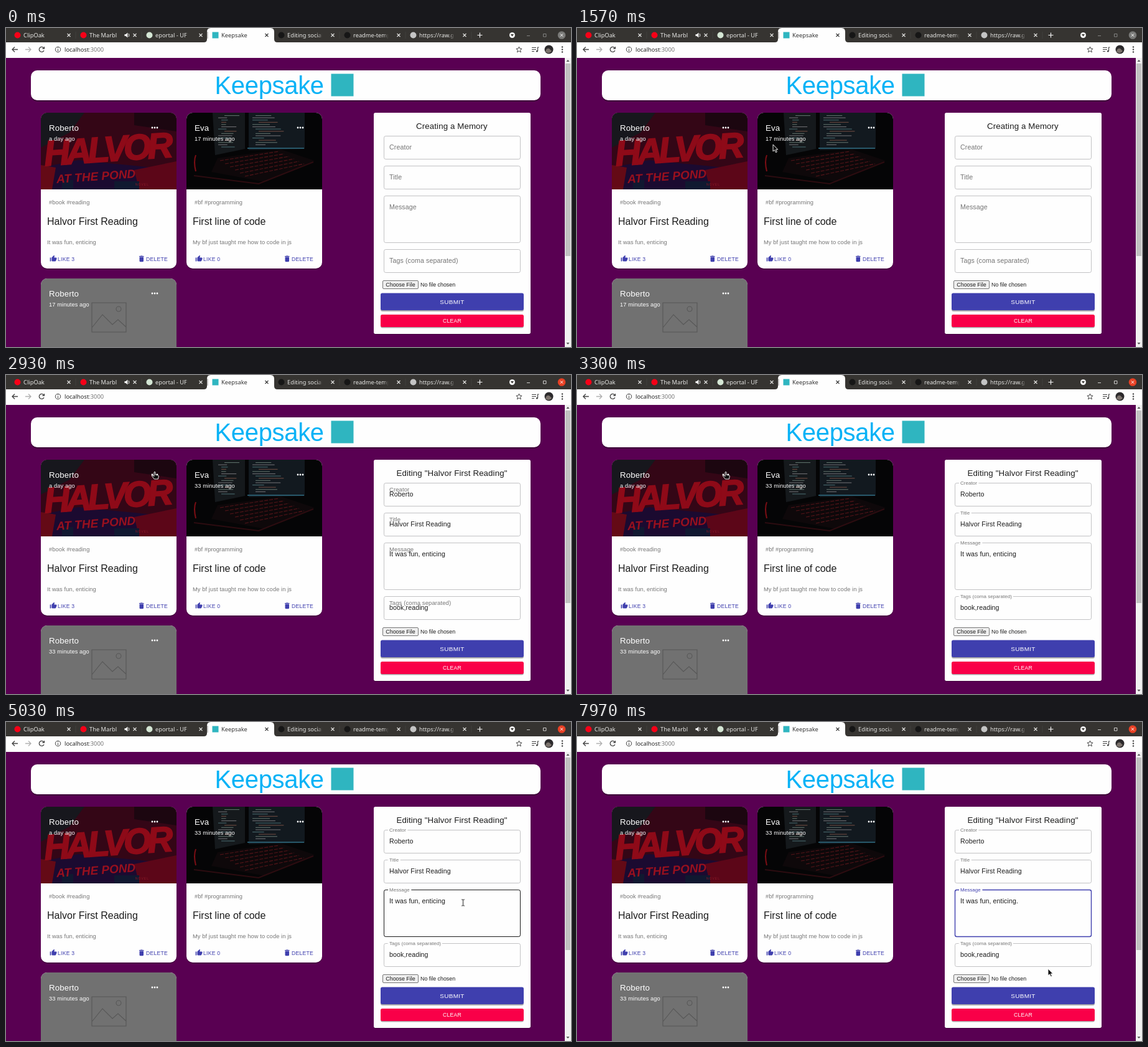
These frames come from a looping animation (908 by 512 pixels, 8000 ms). An HTML page:

```html
<!DOCTYPE html>
<html lang="en">
<head>
<meta charset="utf-8">
<title>Keepsake</title>
<style>
  html, body { margin: 0; height: 100%; overflow: hidden; background: #590052; }
  svg { display: block; width: 100vw; height: 100vh; font-family: 'Liberation Sans', Arial, sans-serif; }
  .ui { font: 9.3px 'Noto Sans', sans-serif; }
  .h6 { font-size: 13.3px; letter-spacing: .0075em; }
  .h5 { font-size: 16px; }
  .body { font-size: 9.31px; letter-spacing: .01em; }
  .input { font-size: 10.64px; letter-spacing: .00938em; }
  .btn { font-size: 8.64px; letter-spacing: .02857em; }
  .mid { text-anchor: middle; }
  .muted { fill: #757575; }
  .blue { fill: #3f3fae; }

  /* One shared 8 s clock: 1% = 80 ms */
  .step { animation: 8s step-end infinite; }
  .before { animation-name: before; }
  .after { animation-name: after; }
  .creating { animation-name: creating; }
  .editing { animation-name: editing; }
  .hover-title { animation-name: hoverTitle; }
  .hover-message { animation-name: hoverMessage; }
  .focus { animation-name: focus; }
  .caret { animation-name: caret; }
  .typed { animation-name: typed; }
  .arrow { animation-name: arrow; }
  .hand { animation-name: hand; }
  .beam { animation-name: beam; }
  .label { paint-order: stroke; stroke: #fefefe; stroke-width: 7px; animation: shrink 8s infinite; }
  .pointer { animation: travel 8s ease-in-out infinite; }

  @keyframes before { 0% { opacity: 1 } 26.25%, 100% { opacity: 0 } }
  @keyframes after { 0% { opacity: 0 } 26.25%, 100% { opacity: 1 } }
  @keyframes creating { 0% { opacity: 1 } 36.25%, 100% { opacity: 0 } }
  @keyframes editing { 0% { opacity: 0 } 36.25%, 100% { opacity: 1 } }
  @keyframes hoverTitle { 0%, 58%, 100% { opacity: 0 } 46.2% { opacity: 1 } }
  @keyframes hoverMessage { 0%, 75%, 100% { opacity: 0 } 58.6% { opacity: 1 } }
  @keyframes focus { 0% { opacity: 0 } 75%, 100% { opacity: 1 } }
  @keyframes caret {
    0%, 82.5%, 93.75%, 100% { opacity: 0; transform: none }
    75% { opacity: 1; transform: none }
    86.25% { opacity: 1; transform: translateX(3px) }
  }
  @keyframes typed { 0% { opacity: 0 } 86.25%, 100% { opacity: 1 } }
  @keyframes arrow { 0%, 33%, 45.8%, 100% { opacity: 0 } 10.9%, 41.6%, 91.2% { opacity: 1 } }
  @keyframes hand { 0%, 41.6%, 100% { opacity: 0 } 33% { opacity: 1 } }
  @keyframes beam { 0%, 91.2%, 100% { opacity: 0 } 45.8% { opacity: 1 } }
  @keyframes shrink {
    0% { transform: none }
    36.25% { transform: none; animation-timing-function: cubic-bezier(0, 0, .2, 1) }
    38.75%, 100% { transform: translateY(-19.4px) scale(.75) }
  }
  @keyframes travel {
    0%, 10.875% { transform: translate(440px, 372px) }
    18.5%, 26.25% { transform: translate(315px, 187px) }
    33.75%, 41.25% { transform: translate(239px, 156px) }
    47%, 56.25% { transform: translate(738px, 239px) }
    60% { transform: translate(735px, 289px) }
    63%, 73% { transform: translate(734.5px, 290px) }
    75%, 90% { transform: translate(734px, 292px) }
    94.5% { transform: translate(750px, 421px) }
    99.4%, 100% { transform: translate(757px, 396px) }
  }
</style>
</head>
<body>
<svg id="stage" viewBox="0 0 908 512"></svg>
<script>
const ink = '#1c1c1c', paper = '#fefefe', indigo = '#3f3fae', bar = '#363431', shade = '#2a0026';
const text = (x, y, s, cls = '', fill = ink, extra = '') =>
  `<text x="${x}" y="${y}" class="${cls}" fill="${fill}" ${extra}>${s}</text>`;
const rect = (x, y, w, h, fill, r = 0, extra = '') =>
  `<rect x="${x}" y="${y}" width="${w}" height="${h}" rx="${r}" fill="${fill}" ${extra}/>`;
const dot = (x, y, r, fill, extra = '') => `<circle cx="${x}" cy="${y}" r="${r}" fill="${fill}" ${extra}/>`;
const stroke = (d, color, width = 1, extra = '') =>
  `<path d="${d}" fill="none" stroke="${color}" stroke-width="${width}" ${extra}/>`;
const repeat = (n, f) => Array.from({ length: n }, (_, i) => f(i)).join('');
const noise = i => Math.abs(Math.sin(i * 12.9898) * 43758.5453) % 1;

function tabs() {
  const items = [
    ['ClipOak', '#f80018'], ['The Marbl', '#f80018'], ['eportal - UF', '#d4e6d4'],
    ['Keepsake', '#2fb5c0'], ['Editing social', '#161616'], ['readme-temp', '#161616'], ['https://raw.g', '#c4c4c4'],
  ];
  return rect(0, 0, 908, 30, bar)
    + `<path d="M318 23q5 0 5-5V6q0-6 6-6h96q6 0 6 6v12q0 5 5 5z" fill="${paper}"/>`
    + items.map(([title, color], i) => {
      const x = 18.5 + i * 106, active = i === 3, fg = active ? '#333' : '#e6e6e4', end = x + 82.5;
      const icon = active ? rect(x - 5, 6.5, 10, 10, color) : dot(x, 11.5, 5, color);
      const fade = i > 1 && !active ? rect(x + 58, 3, 16, 17, 'url(#tabFade)') : '';
      return icon + text(x + 9.5, 15, title, 'ui', fg) + fade
        + stroke(`M${end - 2.5} 9l5 5m0-5l-5 5`, fg, 1.1)
        + (active ? '' : stroke(`M${end + 11} 6v11`, '#4c4a47', .6));
    }).join('')
    + `<path d="M190.500 10h2l3-2.500v8l-3-2.500h-2z" fill="#f4f4f4"/>` + stroke('M197 9q2 2.500 0 5', '#f4f4f4')
    + stroke('M757.500 11.500h8m-4-4v8', '#f4f4f4', 1.2)
    + dot(813.5, 11.5, 4.5, '#f8f8f8') + `<path d="M811 10h5l-2.500 3.500z" fill="${bar}"/>`
    + `<g class="step before">${windowButtons('#8c8c8a', '#7a7a78')}</g>`
    + `<g class="step after">${windowButtons('#e0e0de', '#e84024')}</g>`;
}

const windowButtons = (fg, close) => stroke('M837 12.500h5M863.500 9.500h4.500v4.500h-4.500z', fg, .9)
  + dot(893, 11.5, 6.3, close) + stroke('M890.800 9.300l4.400 4.400m0-4.400l-4.400 4.400', '#fff', 1);

function toolbar() {
  const fg = '#444';
  return rect(0, 23, 908, 25, paper)
    + stroke('M19 34.500H10m4-4l-4 4 4 4', fg, 1.3)
    + stroke('M31 34.500h9m-4-4l4 4-4 4', '#b0b0b0', 1.3)
    + stroke('M60.500 32a4 4 0 1 0 .5 4M61.500 30v3h-3', fg, 1.3)
    + stroke('M83.500 34v3M83.500 31.500v1.200', fg, 1.1) + dot(83.5, 34.5, 4.2, 'none', `stroke="${fg}"`)
    + text(94, 38, 'localhost<tspan fill="#757575">:3000</tspan>', 'ui', '#222')
    + stroke('M824.500 30l1.300 3 3.300.3-2.500 2.200.8 3.300-2.900-1.800-2.900 1.800.8-3.300-2.500-2.200 3.300-.3z', fg, 1)
    + stroke('M845 31.500h7m-7 3h7m-7 3h4M854.500 37v-6h2', fg, 1.2) + dot(853.3, 37.3, 1.4, fg)
    + dot(872.5, 34.5, 7, '#2c2a2c') + '<path d="M867 38q1-6 6-5l4 4q-4 6-10 1z" fill="#7b726c"/>'
    + [30.5, 34.5, 38.5].map(y => dot(894, y, 1.2, fg)).join('');
}

function scrollbar() {
  return rect(898, 48, 10, 464, '#f1f1f1') + rect(899, 57, 8, 309, '#c1c1c1')
    + '<path d="M900.500 54h5l-2.500-3zM900.500 505h5l-2.500 3z" fill="#555"/>';
}

function bookPhoto() {
  return rect(0, 0, 218, 123, '#340616')
    + '<path d="M0 0h70l-24 32-46 24z" fill="#17171d"/><path d="M150 0h68v30l-68-10z" fill="#1c0610"/>'
    + '<path d="M0 88l60-12 120 12 38-8v43H0z" fill="#1b0a30"/>'
    + '<path d="M150 92l68-14v45h-60z" fill="#5c0618"/><path d="M0 84l24 4-6 35H0z" fill="#640a16"/>'
    + '<path d="M34 108h18v15H34zM118 110h40v13h-40z" fill="#101830"/>'
    + '<g transform="rotate(-4 110 60)" font-weight="bold" font-style="italic">'
    + text(5, 78, 'HALVOR', '', '#8e0a18', 'font-size="57" letter-spacing="-6" stroke="#8e0a18" stroke-width="2"')
    + text(22, 107, 'AT THE POND', '', '#98101e', 'font-size="19"') + '</g>'
    + text(152, 117, 'NOVEL', '', '#8b1a28', 'font-size="5" letter-spacing="1"');
}

function codePhoto() {
  const code = (x, y, rows, span, seed) => repeat(rows, i =>
    rect(x + 5 * Math.floor(noise(i + seed) * 3), y + i * 3.6, span * (.25 + .6 * noise(i * 3 + seed)), 1.1,
      ['#5c6e68', '#6c6c70', '#48686c', '#6c4a40'][i % 4]));
  return rect(0, 0, 218, 123, '#050506')
    + '<path d="M42 0h52v58l-48 10z" fill="#15191c"/><path d="M100 0h90v58l-90 2z" fill="#12191f"/>'
    + code(51, 4, 15, 30, 1) + code(106, 4, 14, 48, 9)
    + rect(98, 56, 91, 2, '#28586a')
    + '<path d="M50 73l102-14 54 18-80 34-86-16z" fill="#0e080a"/>'
    + repeat(6, r => stroke(`M${54 + r * 8} ${77 + r * 5}L${149 + r * 8} ${62 + r * 4}`, '#541418', 1.1, 'stroke-dasharray="6 2"'))
    + stroke('M15 68q-4 10 0 26', '#7a0e14', 2) + stroke('M12 101l104 13 88-35', '#2c0c10', 2);
}

const emptyPhoto = () => rect(0, 0, 218, 123, '#717171')
  + '<g transform="translate(81 38)">'
  + stroke('M1 1h55v47H1zM1 41l17-21 16 16 9-8 13 12', '#575757', 1.1)
  + dot(44, 11, 4, 'none', 'stroke="#575757" stroke-width="1.100"') + '</g>';

const timeAgo = minutes => text(13, 44.5, minutes + ' minutes ago', 'body', paper);
const bothTimes = `<g class="step before">${timeAgo(17)}</g><g class="step after">${timeAgo(33)}</g>`;

function card(x, y, photo, name, time, tags, title, message, likes) {
  return `<g transform="translate(${x} ${y})">`
    + rect(0, 1.5, 218, 250, shade, 10, 'opacity=".45"')
    + `<g clip-path="url(#card)">${rect(0, 0, 218, 250, paper)}${photo}</g>`
    + text(13, 28.5, name, 'h6', paper) + time
    + [179, 183, 187].map(cx => dot(cx, 24, 1.4, paper)).join('')
    + text(13, 146.5, tags, 'body muted') + text(10, 179.5, title, 'h5') + text(10, 210.5, message, 'body muted')
    + `<path transform="translate(13.600 227.600) scale(.54)" fill="${indigo}" d="M2 20h3V9H2zM22 11q0-2-2-2h-5.500l1-5L14 2 7 9v9q0 2 2 2h9q1 0 2-2l2-5z"/>`
    + text(27, 237.5, 'LIKE ' + likes, 'btn blue')
    + `<path transform="translate(155.300 227.800) scale(.54)" fill="${indigo}" d="M6 19q0 2 2 2h8q2 0 2-2V7H6zM19 4h-3.500l-1-1h-5l-1 1H5v2h14z"/>`
    + text(169, 237.5, 'DELETE', 'btn blue') + '</g>';
}

function field(y, h, label, value, hover = '') {
  const box = (cls, color, w) => rect(607.5, y + .5, 219, h - 1, 'none', 2.7, `class="${cls}" stroke="${color}" stroke-width="${w}"`);
  const base = y + 22.4, message = label === 'Message';
  return box('', '#c2c2c4', 1)
    + (hover && box('step ' + hover, ink, 1))
    + (message ? box('step focus', indigo, 1.4) : '')
    + `<g transform="translate(616 ${base})">`
    + text(0, 0, label, 'input label', '#757575')
    + (message ? `<g class="step focus">${text(0, 0, label, 'input label', indigo)}</g>` : '') + '</g>'
    + `<g class="step editing">${text(616, base, value, 'input')}</g>`;
}

function form() {
  const small = 'font-size="8.870"';
  return rect(591, 137, 252, 355, shade, 3, 'opacity=".5"') + rect(591, 136, 252, 355, paper, 2.7)
    + `<g class="step creating">${text(716.5, 162, 'Creating a Memory', 'h6 mid')}</g>`
    + `<g class="step editing">${text(716.5, 162, 'Editing "Halvor First Reading"', 'h6 mid')}</g>`
    + field(173, 38, 'Creator', 'Roberto')
    + field(221, 38, 'Title', 'Halvor First Reading', 'hover-title')
    + field(269, 76, 'Message', 'It was fun, enticing<tspan class="step typed">.</tspan>', 'hover-message')
    + rect(706, 283, .9, 11, ink, 0, 'class="step caret"')
    + field(355, 38, 'Tags (coma separated)', 'book,reading')
    + rect(605.5, 405.5, 57, 13, '#efefef', 1.5, 'stroke="#767676"')
    + text(634, 415, 'Choose File', 'mid', ink, small) + text(666, 415, 'No file chosen', '', ink, small)
    + rect(602, 427, 230, 28, '#8c8c8c', 3, 'opacity=".7"') + rect(602, 425.5, 230, 27.5, indigo, 2.7)
    + text(717, 443, 'SUBMIT', 'mid', paper, 'font-size="9.980" letter-spacing=".285"')
    + rect(602, 461.5, 230, 20, '#8c8c8c', 3, 'opacity=".7"') + rect(602, 460, 230, 20, '#f90048', 2.7)
    + text(717, 473, 'CLEAR', 'btn mid', '#fff');
}

function pointer() {
  const shape = (cls, d) => `<path class="step ${cls}" d="${d}" fill="#111" stroke="#fff" stroke-width=".9" stroke-linejoin="round"/>`;
  return '<g class="pointer">'
    + shape('arrow', 'M0 0v11l2.600-2.200 1.900 4 1.900-.9-1.900-3.800h3.300z')
    + shape('hand', 'M-1 0q1-1.500 2 0v4l4.500 1q1 .5.800 2l-1 4h-6l-4-5q0-1.500 1.500-.8l2.200 1.300z')
    + `<g class="step beam">${stroke('M-2.300-5h1.600l.7.700.7-.7h1.600M0-4.300v8.600M-2.300 5h1.600l.7-.7.700.7h1.600', '#111', 1)}</g></g>`;
}

document.getElementById('stage').innerHTML = `<defs>
    <clipPath id="card">${rect(0, 0, 218, 250, paper, 10)}</clipPath>
    <linearGradient id="tabFade"><stop stop-color="${bar}" stop-opacity="0"/><stop offset=".5" stop-color="${bar}"/></linearGradient>
  </defs>`
  + rect(0, 0, 908, 512, '#590052') + tabs() + toolbar() + scrollbar()
  + rect(40, 70, 819, 48, shade, 10, 'opacity=".6"') + rect(40, 68, 819, 48, paper, 10)
  + text(335.5, 106, 'Keepsake', '', '#08b2f6', 'font-size="40" letter-spacing="-.330"')
  + rect(522.5, 73.5, 36, 36, '#2fb5c0')
  + card(56, 136, bookPhoto(), 'Roberto', text(13, 44.5, 'a day ago', 'body', paper),
    '#book #reading', 'Halvor First Reading', 'It was fun, enticing', 3)
  + card(290, 136, codePhoto(), 'Eva', bothTimes, '#bf #programming', 'First line of code', 'My bf just taught me how to code in js', 0)
  + card(56, 402, emptyPhoto(), 'Roberto', bothTimes, '', '', '', 0)
  + form() + pointer();
</script>
</body>
</html>
```
